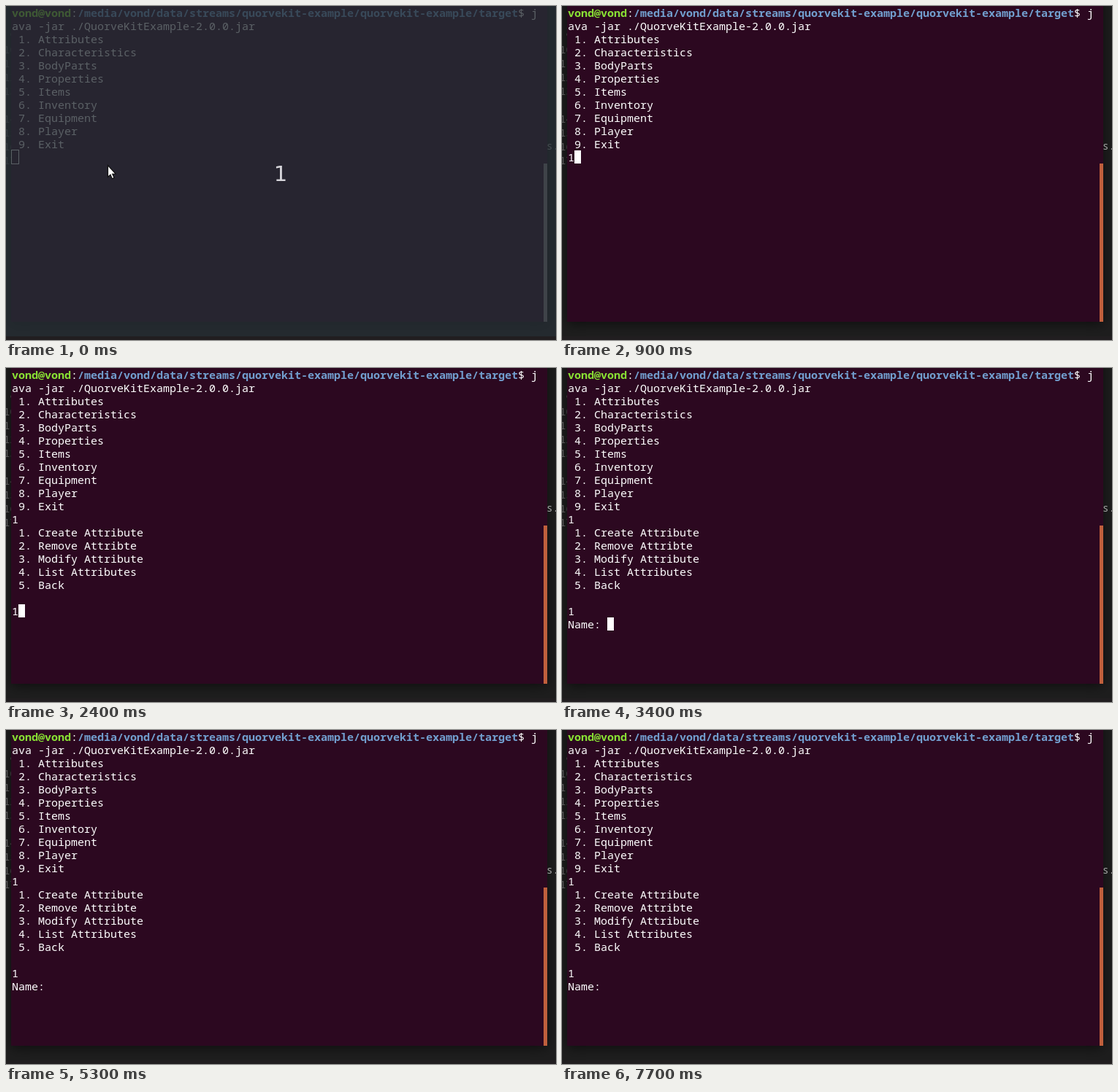
Write an HTML page with a canvas that moves like this. It is 753x458 px and loops after 8000 ms.

```html
<!DOCTYPE html>
<html lang="en">
<head>
<meta charset="utf-8">
<title>Terminal session</title>
<style>
  html, body { margin: 0; width: 100%; height: 100%; overflow: hidden; background: #1e1e1e; }
  canvas { display: block; }
</style>
</head>
<body>
<canvas id="stage" width="753" height="458"></canvas>
<script>
const W = 753, H = 458, LOOP = 8000;
const COL = 9, ROW = 18, LEFT = 8;
const MONO = '"Noto Sans Mono", "DejaVu Sans Mono", monospace';
const ctx = document.getElementById('stage').getContext('2d');

const USER = 'vond@vond';
const PATH = '/media/vond/data/streams/quorvekit-example/quorvekit-example/target';
const MAIN = ['Attributes', 'Characteristics', 'BodyParts', 'Properties', 'Items',
  'Inventory', 'Equipment', 'Player', 'Exit'];
const SUB = ['Create Attribute', 'Remove Attribte', 'Modify Attribute', 'List Attributes', 'Back'];

// Moments of the session, in ms
const FOCUS = 300, ACTIVE = 400, HIDE_POINTER = 700;
const PICK = 900, ENTER = 1400, PICK_SUB = 2400, ENTER_SUB = 3400;
// The caret flips at each of these, starting visible
const BLINKS = [1900, 2100, 2700, 2900, 3500, 4100, 4700, 4900, 5300, 5900, 6500, 7100, 7700];

function rect(x, y, w, h, color) {
  ctx.fillStyle = color;
  ctx.fillRect(x, y, w, h);
}

function print(text, col, row, color = '#fff', weight = 400) {
  ctx.font = `${weight} 15px ${MONO}`;
  ctx.fillStyle = color;
  ctx.fillText(text, LEFT + col * COL, row * ROW + 15);
}

function menu(items, row) {
  items.forEach((item, i) => print(`${i + 1}. ${item}`, 1, row + i));
}

function drawEditor() {
  rect(0, 0, W, H, '#1e1e1e');
  ctx.font = `14px ${MONO}`;
  ctx.fillStyle = '#6a6a6a';
  for (let n = 9; n <= 17; n++) {
    const line = n - 9 + (n > 13 ? 1 : 0);
    ctx.fillText(String(n).padStart(2), -3, 46 + line * 19);
  }
}

function drawWindow(t) {
  ctx.save();
  ctx.shadowColor = 'rgba(0,0,0,.55)';
  ctx.shadowBlur = 16;
  ctx.shadowOffsetY = 3;
  rect(7, -20, 734, 453, '#2c0820');
  ctx.restore();
  rect(736, 216, 5, 217, t >= ACTIVE ? '#c05f3c' : '#8e878b');
  ctx.font = `14px ${MONO}`;
  ctx.fillStyle = '#a4a4a4';
  ctx.fillText('s.', 740, 197);
}

function drawSession(t) {
  const dollar = USER.length + 1 + PATH.length;
  print(USER, 0, 0, '#8ae234', 700);
  print(':', USER.length, 0);
  print(PATH, USER.length + 1, 0, '#729fcf', 700);
  print('$ j', dollar, 0);
  print('ava -jar ./QuorveKitExample-2.0.0.jar', 0, 1);
  menu(MAIN, 2);
  if (t >= PICK) print('1', 0, 11);
  if (t >= ENTER) menu(SUB, 12);
  if (t >= PICK_SUB) print('1', 0, 18);
  if (t >= ENTER_SUB) print('Name:', 0, 19);
}

function caretCell(t) {
  if (t >= ENTER_SUB) return [6, 19];
  if (t >= PICK_SUB) return [1, 18];
  if (t >= ENTER) return [0, 18];
  return [t >= PICK ? 1 : 0, 11];
}

function drawCaret(t) {
  if (t < FOCUS) {
    ctx.strokeStyle = '#fff';
    ctx.lineWidth = 1;
    ctx.strokeRect(7.5, 197.5, 10, 19);
    return;
  }
  if (BLINKS.filter(b => b <= t).length % 2) return;
  const [col, row] = caretCell(t);
  rect(LEFT + col * COL, row * ROW, COL, ROW, '#fff');
}

function drawArrow() {
  const pts = [[139.5, 218.5], [139.5, 234.5], [143, 231.3], [145.3, 236.8],
    [148, 235.6], [145.7, 230.3], [150, 230]];
  ctx.beginPath();
  pts.forEach(([x, y]) => ctx.lineTo(x, y));
  ctx.closePath();
  ctx.fillStyle = '#fff';
  ctx.fill();
  ctx.strokeStyle = '#111';
  ctx.lineWidth = 1.2;
  ctx.stroke();
}

function drawBeam() {
  const parts = [[141, 215, 1, 13], [139, 214, 2, 1], [142, 214, 2, 1],
    [139, 228, 2, 1], [142, 228, 2, 1]];
  parts.forEach(([x, y, w, h]) => rect(x - 1, y - 1, w + 2, h + 2, '#12060e'));
  parts.forEach(([x, y, w, h]) => rect(x, y, w, h, '#e4eae0'));
}

function drawCountdown() {
  rect(0, 0, W, H, 'rgba(39,47,53,.76)');
  ctx.font = '29px "DejaVu Sans", sans-serif';
  ctx.textAlign = 'center';
  ctx.fillStyle = '#d6d5da';
  ctx.fillText('1', 376, 240);
  ctx.textAlign = 'left';
}

function draw(t) {
  drawEditor();
  drawWindow(t);
  drawSession(t);
  drawCaret(t);
  if (t < FOCUS) {
    drawCountdown();
    drawArrow();
  } else if (t < HIDE_POINTER) {
    drawBeam();
  }
  rect(0, 453, W, 5, '#211e20');
}

const start = performance.now();
function tick() {
  draw((performance.now() - start) % LOOP);
  requestAnimationFrame(tick);
}
tick();
</script>
</body>
</html>
```
